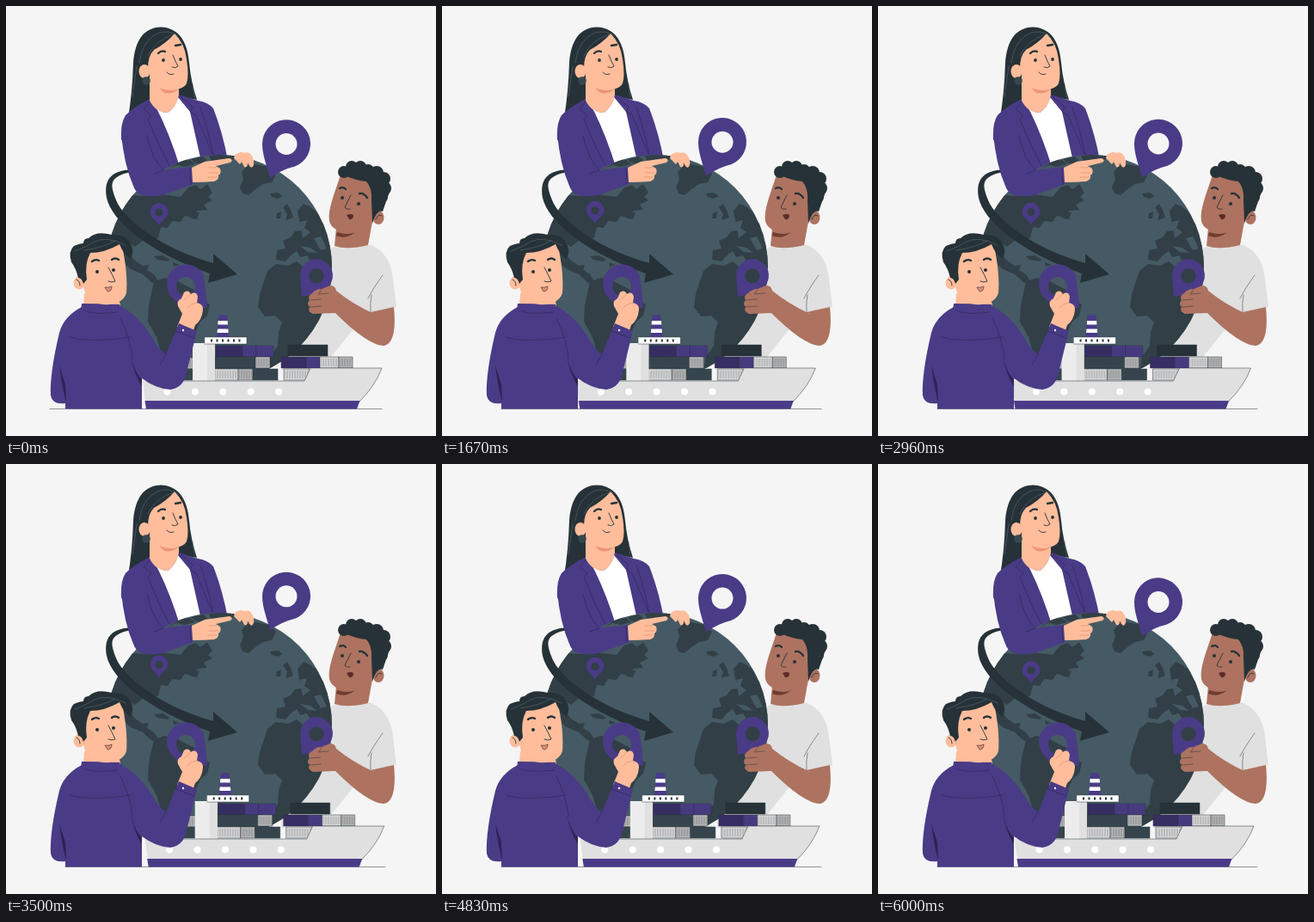
Write an HTML page that moves like this. It is 500 by 500 pixels and loops after 6.04 s.

```html
<!DOCTYPE html>
<html lang="en">
<head>
<meta charset="utf-8">
<title>Global shipping</title>
<style>
html, body { margin: 0; width: 100%; height: 100%; overflow: hidden; background: #f5f5f5; }
svg { display: block; width: 100%; height: 100%; }
.p { fill: #4a3b87; } .d { fill: #263238; } .g { fill: #455a64; } .w { fill: #fff; }
.m { fill: #323f46; } .s { fill: #ffbd9b; } .b { fill: #ad7360; } .e { fill: #e0e0e0; }
.line { fill: none; stroke: #263238; stroke-width: .9; stroke-linecap: round; stroke-linejoin: round; }
.thin { stroke-width: .5; }
.crease { stroke: #d98767; stroke-width: .6; }
.seam { stroke: #2c2450; stroke-width: .6; }
.hairline { stroke: #64757d; stroke-width: .5; }
.brow { stroke-width: 2.3; }
</style>
</head>
<body>
<svg viewBox="0 0 500 500">
<defs>
  <clipPath id="disc"><circle cx="248" cy="304" r="131"/></clipPath>
  <pattern id="ribs" width="3" height="13" patternUnits="userSpaceOnUse"><path d="M1 2V11" stroke="#263238" stroke-width=".6" opacity=".6"/></pattern>
</defs>
<path id="ground" class="line thin"/>

<!-- woman, behind the globe -->
<path class="d" d="M180 24.500C161 25 150 39 148 66Q147 100 142 130L168 125 200 105 222 109Q215 88 213 66C211 39 199 25 180 24.500Z"/>
<path class="p" d="M167 108Q148 118 139 127Q133 136 134 155L160 215H250L258 180Q252 147 241 119Q235 112 223 110L201 103Z"/>
<path class="w" d="M173 115Q178 124 188 124Q197 118 200 106L214 123 229 190H203Q190 147 173 115Z"/>
<path class="s" d="M167 78V110Q174 124 188 124Q198 118 201 103V92Z"/>
<path class="s" d="M165 72Q165 58 172 51Q187 43 196 32Q208 44 210 62Q213 81 210 90C205 100 182 100 171 89Z"/>
<ellipse class="s" cx="161" cy="76" rx="6.500" ry="8"/>
<path class="line hairline" d="M199 34Q190 28 178 31Q158 39 155 66M195 33Q174 39 165 58M152 70L147 105M217 90L219 106"/>
<circle cx="163" cy="87" r="4.800" fill="#37474f"/>
<path class="line" d="M194 57Q197 65 200 70Q197 73 193 71M187 77Q190 81 195 79"/>
<path class="line brow" d="M177 55Q181 51 185 53M197 46L203 45"/>
<circle class="d" cx="183" cy="63" r="1.900"/><circle class="d" cx="203" cy="62" r="1.900"/>
<path d="M178 95Q190 101 202 96Q194 103 184 101Z" fill="#ed9473"/>
<path class="line seam" d="M167 111L160 120 169 127 165 132Q177 162 190 186M203 106L217 117 214 123 221 127 240 172M226 118Q234 140 241 173"/>

<!-- man on the right: torso and head -->
<path class="e" d="M382 280Q400 276 425 278Q447 288 450 317L454 350 424 357 402 378 366 423H320V300Z"/>
<path class="b" d="M384 258L382 279Q397 284 421 278L427 245Z"/>
<path class="b" d="M389 196C383 216 372 240 377 253C383 266 411 267 421 260Q430 250 430 220Q425 194 389 196Z"/>
<ellipse class="b" cx="433" cy="246" rx="6.500" ry="8"/>
<path d="M385 263Q398 267 406 263Q395 272 384 267Z" fill="#703d32"/>
<g class="d" id="curls"></g>
<path class="d" d="M395 190Q408 185 421 190L446 216Q441 230 438 239Q431 236 426 253L425 226Q426 212 419 204Q407 203 394 197Z"/>
<path class="line" d="M401 220L394 234Q396 237 400 236M430 248Q433 241 437 244"/>
<path class="line brow" d="M388 212Q392 210 395 213M411 218Q416 217 420 223"/>
<circle class="d" cx="391" cy="223" r="2"/><circle class="d" cx="410" cy="230" r="2"/>
<path d="M396 243Q401 241 404 243Q404 249 399 248Z" fill="#5c2c28"/>
<path class="line thin" d="M438 313Q427 328 421 340M424 357Q423 346 425 336"/>

<!-- globe -->
<circle class="g" cx="248" cy="304" r="131"/>
<g class="m" clip-path="url(#disc)">
  <path d="M188 190L203 180 214 179 220 184 208 187 198 185ZM216 178L229 175 234 179 228 184 219 182ZM236 174L252 172 270 173 262 180 248 178 240 183Z"/>
  <path d="M272 211L276 201 274 193 283 183 295 185 306 187 314 195 309 205 299 207 290 213 282 220 275 218ZM307 218L316 217 322 221 316 224 309 222Z"/>
  <path d="M203 222L212 211 221 208 226 213 234 207 240 217 235 222 240 226 230 231 234 237 223 238 215 246 208 244 203 251 193 250 188 258 180 257 177 270 160 272 150 280 141 274 145 290 130 305 115 280 122 238 145 220 163 221 180 219Z"/>
  <path d="M216 240L225 240 222 248 215 247ZM172 291L182 290 191 295 187 297 176 295ZM194 298L202 301 195 303Z"/>
  <path d="M140 285L150 296 159 302 166 301 164 307 172 312 177 320 170 322 159 312 145 306 132 295Z"/>
  <path d="M172 321L184 316 198 319 211 326 221 331 227 342 237 347 234 360 226 367 219 382 207 390 199 403 196 420 190 431 181 405 175 385 165 367 166 347Z"/>
  <path d="M322 234L327 230 331 237 334 246 325 249 327 242ZM315 241L320 239 319 247 314 247Z"/>
  <path d="M339 238L346 230 353 233 361 239 368 252 385 260V310L365 294 356 300 350 290 342 292 338 285 331 290 325 297 314 295 315 284 325 282 322 273 331 269 336 262 345 261 341 250Z"/>
  <path d="M304 308L314 300 328 302 338 297 346 304 358 305 368 302 385 310V375L365 395 350 408 334 422 319 429 304 424 307 408 316 395 317 379 321 368 313 360 301 361 293 350 295 335 300 320Z"/>
  <path class="g" d="M342 251L350 249 347 258 354 263 345 270ZM358 270L366 268 373 282 366 284ZM342 279L354 281 362 287 351 286Z"/>
</g>
<path class="d" d="M148 190C125 191 113 199 117 223C123 250 165 286 237 311L235 322 269 312 241 288 241 299C188 284 144 255 130 230C122 212 121 204 129 199Q136 194 148 193Z"/>
<g class="float">
  <path class="p" fill-rule="evenodd" d="M178 255Q175 250 171 247A10.300 10.300 0 1 1 185 247Q180 251 178 255ZM178 235.500A4.600 4.600 0 1 0 178 244.700A4.600 4.600 0 1 0 178 235.500Z"/>
</g>

<!-- woman, in front of the globe -->
<path class="p" d="M134 148Q137 184 148 209C152 221 163 223 182 220L218 207 216 187 181 191Q175 157 163 136Z"/>
<path class="line seam" d="M164 151Q170 179 183 191L172 195M214 189L215 207"/>
<path class="s" d="M216 188L231 181 260 177Q265 179 261 182L244 186 249 189Q251 194 247 197Q248 202 242 204Q230 205 217 205Z"/>
<path class="line crease" d="M236 188L245 188M236 194L247 194M235 199L245 199"/>
<path class="s" d="M265 177Q266 171 270 171Q274 169 277 171Q282 169 285 173Q289 178 288 185Q286 190 283 186L281 182Q281 189 277 187L274 181Q272 186 270 182L267 179Z"/>
<g class="float">
  <path class="p" d="M307 200C303 185 298 173 298 160.500A28 28 0 1 1 336 186.500Q321 190 307 200Z"/>
  <circle cx="326" cy="160.500" r="12.500" fill="#f5f5f5"/>
</g>

<!-- pin and arm of the man on the right -->
<path class="p" fill-rule="evenodd" d="M344 338L342 314A19 19 0 1 1 376 325Q361 336 344 338ZM361 305.500A8.500 8.500 0 1 0 361 322.500A8.500 8.500 0 1 0 361 305.500Z"/>
<path class="b" d="M424 356L451 350C454 380 449 394 439 395C427 395 406 380 383 357L357 358Q350 355 353 350Q349 346 353 342Q350 337 356 334Q360 329 367 329L377 325Q383 325 384 331Q402 346 428 358Z"/>
<path class="line thin" d="M354 342L366 341M353 350L366 349M367 330L363 335 375 334"/>

<!-- ship -->
<g id="ship">
  <g id="cargo"></g>
  <path d="M217 436V392H231V385H243V436Z" fill="#ececec"/>
  <path class="e" d="M234 393H243V436H234Z"/>
  <path class="w" d="M232 385H280V393H232Z"/>
  <path class="line thin" d="M231 385H280V393H231"/>
  <path d="M238 389H276" stroke="#263238" stroke-width="3" stroke-dasharray="2 4.500"/>
  <path class="p" d="M247 360Q252 358 257 360L259 385H245Z"/>
  <path class="w" d="M246.600 366H257.600L258 370.500H246.300ZM246 375.500H258.300L258.600 380H245.500Z"/>
  <path class="e" d="M159 436H347L354 421H437Q430 441 411 460H162Z"/>
  <path class="p" d="M161.500 459H411.500L408 468.500H163Z"/>
  <path class="line thin" d="M190 436H347L354 421H437Q430 441 411 460"/>
  <g id="ports" class="w"></g>
</g>

<!-- man on the left -->
<path class="p" fill-rule="evenodd" d="M234 351L201 346Q188 337 187 325A22.500 22.500 0 0 1 230 314Q233 334 234 351ZM209 315A11 11 0 1 0 209 337A11 11 0 1 0 209 315Z"/>
<path class="s" d="M199 373L205 358 200 349Q198 343 204 340L207 333Q212 329 215 335Q221 331 223 338L222 345Q230 347 229 353Q228 365 220 371L217 380Z"/>
<path class="line crease" d="M207 342Q213 337 215 335M222 345Q215 346 211 351"/>
<path class="p" d="M88 350Q67 361 62 380C55 409 51 436 52 453Q54 464 69 462V468.500H158V433Q174 445 191 446Q205 444 209 430L222 378 201 369 186 405Q177 399 169 384Q154 360 133 349Z"/>
<path d="M62 418Q65 443 70 461L69 440Z" fill="#2c2450"/>
<path d="M145 408Q151 429 158 434V442Q149 428 145 408Z" fill="#2c2450"/>
<path class="line seam" d="M74 385Q96 392 145 385M88 352Q95 360 130 356M133 363Q145 387 147 410M186 405L179 417M197 378L219 386"/>
<circle class="w" cx="206" cy="377" r="1.200"/>
<path class="s" d="M91 334L90 349Q110 353 133 349L131 337Z"/>
<path class="p" d="M88 346Q110 346 132 347L134 354Q112 357 87 354Z"/>
<path class="s" d="M92 284L134 274Q142 310 140 334C135 348 115 350 101 344Q92 339 90 326Z"/>
<ellipse class="s" cx="85" cy="322" rx="6.500" ry="7.500"/>
<path class="d" d="M84 316Q81 304 76 298Q72 285 79 279Q86 276 90 276Q90 270 96 270Q105 261 123 266Q139 265 144 275Q150 283 145 294Q136 288 132 277Q115 287 98 287Q91 300 94 318L90 323Q88 316 84 316Z"/>
<path class="line hairline" d="M80 285Q96 279 103 274Q117 267 139 278M91 284Q113 281 127 273"/>
<path class="line" d="M119 304Q124 313 127 320Q123 322 119 320M82 318Q86 320 86 325"/>
<path class="line brow" d="M100 297Q104 294 108 296M123 295Q127 292 131 295"/>
<circle class="d" cx="106" cy="309" r="2"/><circle class="d" cx="125" cy="307" r="2"/>
<path d="M115 327Q119 328 123 326Q123 332 118 332Z" fill="#e58a70" stroke="#263238" stroke-width=".6"/>
</svg>
<script>
const $ = id => document.getElementById(id);
const dot = (x, y, r) => `<circle cx="${x}" cy="${y}" r="${r}"/>`;
const box = (x, y, w, fill) =>
  `<g transform="translate(${x} ${y})" stroke="#263238" stroke-width=".5"><path fill="${fill}" d="M0 0H${w}V13H0Z"/><path fill="url(#ribs)" stroke="none" d="M1 0H${w - 1}V13H1Z"/></g>`;

const violet = '#4a3b87', indigo = '#382d67', slate = '#37474f', grey = '#b5b5b5', pale = '#d8d8d8', black = '#263238';
$('cargo').innerHTML = [
  [204, 409, 14, grey], [204, 422, 14, slate],
  [244, 395, 31, indigo], [275, 395, 16, violet], [291, 395, 20, violet],
  [242, 408, 48, slate], [290, 408, 17, grey],
  [242, 422, 28, pale], [270, 422, 17, grey], [287, 422, 29, slate],
  [328, 394, 46, black], [320, 408, 29, indigo], [349, 408, 16, violet],
  [365, 408, 22, pale], [387, 408, 16, grey], [323, 422, 30, pale]
].map(c => box(...c)).join('');
$('ports').innerHTML = [0, 1, 2, 3, 4].map(i => dot(187.5 + i * 32.4, 448.5, 4)).join('');
$('curls').innerHTML = [
  [393, 193, 7], [402, 187, 7], [412, 187, 7], [421, 191, 7], [431, 194, 8],
  [439, 201, 8], [440, 212, 8], [437, 222, 7]
].map(c => dot(...c)).join('');

const loop = 6040, cycle = 6000, bob = 1500;
const sway = [0, -1, 2, -4, 4, -4, 4, -4, 2, -1, 0, 0];
const floats = document.querySelectorAll('.float');

function draw(now) {
  const t = Math.min(now % loop, cycle);
  const phase = t % bob / bob;
  const lift = -10 * (1 - Math.abs(1 - 2 * phase));
  floats.forEach(f => f.setAttribute('transform', `translate(0 ${lift})`));

  const k = t / cycle * 10, i = Math.floor(k);
  const x = sway[i] + (sway[i + 1] - sway[i]) * (k - i);
  $('ship').setAttribute('transform', `translate(${x} 0)`);
  $('ground').setAttribute('d', t < 1000 ? 'M51 468.500H437' : 'M69 468.500H441');
}

const start = performance.now();
function tick() {
  draw(performance.now() - start);
  requestAnimationFrame(tick);
}
tick();
</script>
</body>
</html>
```
